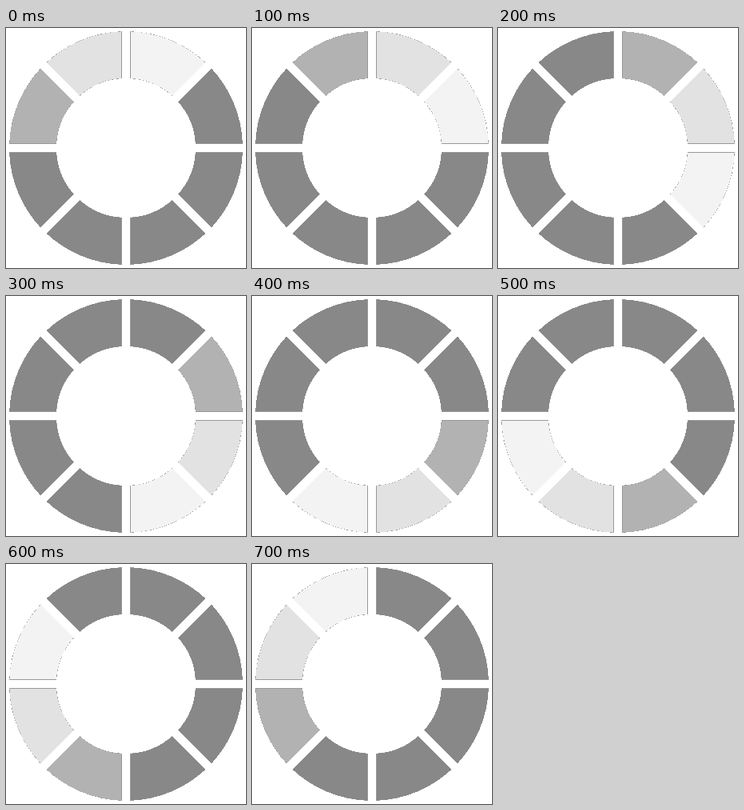
An HTML page that plays this animation: 300 px wide and 300 px high, repeating every 0.8 s.

```html
<!DOCTYPE html>
<html lang="en">
<head>
<meta charset="utf-8">
<title>Loading ring</title>
<style>
  html, body { margin: 0; width: 100%; height: 100%; overflow: hidden; background: #fff; }
  svg { display: block; width: 100vw; height: 100vh; shape-rendering: crispEdges; }
  .base { fill: #989898; }
  .glow { animation: fade 800ms step-end infinite; }
  @keyframes fade {
    0% { fill: #f3f3f3; }
    12.5% { fill: #e2e2e2; }
    25% { fill: #b2b2b2; }
    37.5%, 100% { fill: #888; }
  }
</style>
</head>
<body>
<svg viewBox="-150 -150 300 300"></svg>
<script>
  const COUNT = 8, STEP = 100, OUTER = 146, INNER = 87, HALF_GAP = 5;
  const svg = document.querySelector('svg');

  // One 45 degree block with parallel-sided gaps, shrunk along its arcs and sides.
  function block(arcInset, sideInset) {
    const outer = OUTER - arcInset, inner = INNER + arcInset, gap = HALF_GAP + sideInset;
    const point = (r, far) => {
      const lead = Math.asin(gap / r);
      const a = far ? Math.PI / 4 - lead : lead;
      return `${(r * Math.sin(a)).toFixed(3)} ${(-r * Math.cos(a)).toFixed(3)}`;
    };
    return `M${point(outer)}A${outer} ${outer} 0 0 1 ${point(outer, true)}` +
      `L${point(inner, true)}A${inner} ${inner} 0 0 0 ${point(inner)}Z`;
  }

  function add(name, d, i) {
    const path = document.createElementNS('http://www.w3.org/2000/svg', 'path');
    path.setAttribute('class', name);
    path.setAttribute('d', d);
    path.setAttribute('transform', `rotate(${i * 360 / COUNT})`);
    svg.append(path);
    return path;
  }

  // The grey block stays visible as a broken hairline around the lighter one.
  const base = block(0, 0), glow = block(0.3, 0.6);
  for (let i = 0; i < COUNT; i++) {
    add('base', base, i);
    add('glow', glow, i).style.animationDelay = `${(i - COUNT) * STEP}ms`;
  }
</script>
</body>
</html>
```
